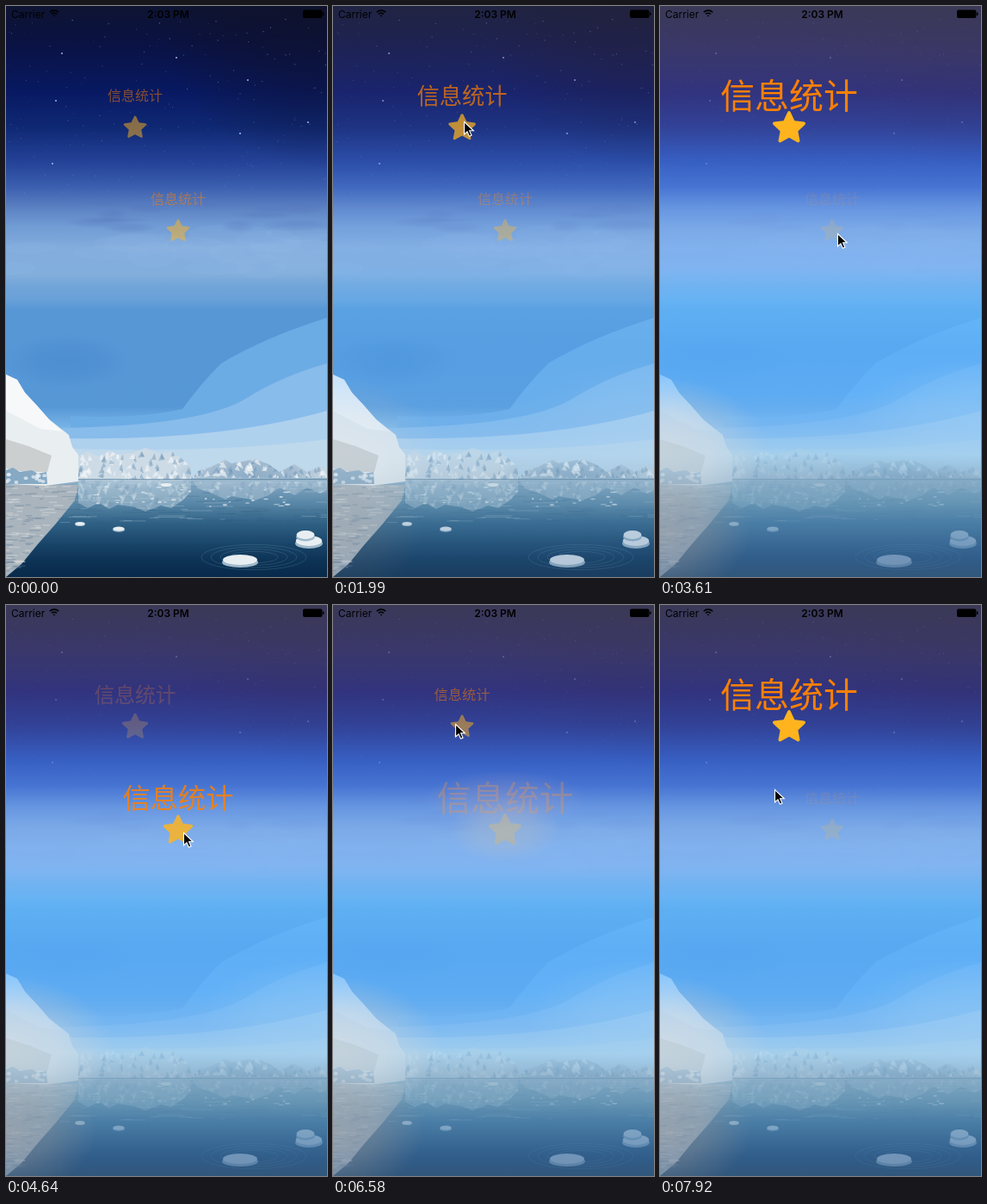
These frames come from a looping animation (373x663 px, 8000 ms). An HTML page with a canvas:

```html
<!DOCTYPE html>
<html lang="zh">
<head>
<meta charset="utf-8">
<style>
html, body { margin: 0; width: 100%; height: 100%; overflow: hidden; }
canvas { display: block; width: 100vw; height: 100vh; }
</style>
</head>
<body>
<canvas id="stage" width="373" height="663"></canvas>
<script>
const W = 373, H = 663, LOOP = 8000;
const ctx = document.getElementById('stage').getContext('2d');

let seed = 7;
const random = (min = 0, max = 1) => {
  seed = (seed * 16807) % 2147483647;
  return min + (max - min) * seed / 2147483647;
};

function layer(draw) {
  const canvas = document.createElement('canvas');
  canvas.width = W;
  canvas.height = H;
  draw(canvas.getContext('2d'));
  return canvas;
}

// Stops are [y, "r,g,b"] pairs.
function verticalFill(g, stops) {
  const top = stops[0][0], bottom = stops[stops.length - 1][0];
  const gradient = g.createLinearGradient(0, top, 0, bottom);
  for (const [y, rgb] of stops) gradient.addColorStop((y - top) / (bottom - top), `rgb(${rgb})`);
  g.fillStyle = gradient;
  g.fillRect(0, top, W, bottom - top);
}

function softSpot(g, x, y, rx, ry, rgb, alpha) {
  g.save();
  g.translate(x, y);
  g.scale(rx, ry);
  const gradient = g.createRadialGradient(0, 0, 0, 0, 0, 1);
  gradient.addColorStop(0, `rgba(${rgb},${alpha})`);
  gradient.addColorStop(.5, `rgba(${rgb},${alpha * .7})`);
  gradient.addColorStop(1, `rgba(${rgb},0)`);
  g.fillStyle = gradient;
  g.fillRect(-1, -1, 2, 2);
  g.restore();
}

function shape(g, path, color) {
  g.fillStyle = color;
  g.fill(new Path2D(path));
}

function blob(g, x, y, rx, ry, color) {
  g.fillStyle = color;
  g.beginPath();
  g.ellipse(x, y, rx, ry, 0, 0, 7);
  g.fill();
}

function drawSky(g) {
  verticalFill(g, [[0, '14,20,50'], [40, '10,18,65'], [100, '8,25,98'], [140, '15,40,115'],
    [180, '35,65,150'], [210, '60,95,175'], [235, '92,130,195'], [255, '112,155,212'],
    [280, '130,172,220'], [312, '130,174,220'], [325, '113,165,216'], [342, '104,160,217'],
    [352, '87,151,214'], [465, '86,151,214'], [490, '120,180,230'], [520, '172,208,236'], [550, '195,217,235']]);
  softSpot(g, W, 0, 200, 190, '16,16,36', .5);
  for (let i = 0; i < 24; i++)
    blob(g, random(0, W), random(262, 308), random(25, 60), random(6, 16), 'rgba(148,186,228,.13)');
  for (let i = 0; i < 12; i++)
    softSpot(g, random(90, W), random(228, 258), random(20, 45), random(3, 8), '85,115,185', .3);
  softSpot(g, 70, 412, 75, 32, '68,134,206', .5);
  shape(g, 'M373 362Q300 385 250 415Q225 440 205 468Q150 480 75 476V520H373Z', '#6cace5');
  shape(g, 'M373 415Q320 430 280 455Q230 487 65 490V520H373Z', '#88bceb');
  shape(g, 'M373 470Q250 505 70 502V550H373Z', '#aed1ee');
  shape(g, 'M373 503Q250 519 75 514V550H373Z', '#bed8ec');
  for (let i = 0; i < 170; i++) {
    const y = 15 + 215 * random() ** 1.2;
    g.fillStyle = `rgba(190,210,255,${random(.15, .65) * (1 - y / 330)})`;
    g.fillRect(random(0, W), y, 1, 1);
  }
  for (const [x, y] of [[198, 60], [351, 135], [65, 55], [58, 110], [272, 148], [54, 183], [281, 86]])
    blob(g, x, y, 1.1, 1.1, 'rgba(200,215,255,.75)');
}

function drawWater(g) {
  verticalFill(g, [[547, '165,192,212'], [560, '118,158,186'], [578, '88,134,166'], [600, '48,98,134'],
    [625, '24,68,104'], [645, '12,50,84'], [663, '8,42,74']]);
  shape(g, 'M0 556H84L80 574L58 601L36 626L18 648L0 663Z', '#a9b4bd');
  for (let i = 0; i < 120; i++) {
    const y = random(552, 600);
    g.fillStyle = random() < .5 ? 'rgba(225,235,242,.22)' : 'rgba(35,80,115,.2)';
    g.fillRect(random(60, W), y, random(5, 35), 1);
  }
  for (let i = 0; i < 100; i++) {
    const y = random(556, 655);
    g.fillStyle = random() < .55 ? 'rgba(235,235,232,.35)' : 'rgba(95,125,148,.35)';
    g.fillRect(random(-8, (663 - y) * .72), y, random(4, 16), 1.5);
  }
  g.strokeStyle = 'rgba(110,155,185,.25)';
  for (let r = 28; r < 62; r += 11) {
    g.beginPath();
    g.ellipse(288, 640, r, r * .24, 0, 0, 7);
    g.stroke();
  }
}

function drawIce(g) {
  const ridges = new Path2D('M84 550V523L95 517L108 523L120 516L130 521L150 518L162 513L180 520L192 517L205 526L215 536V550Z'
    + 'M217 548L223 540L240 534L255 527L262 531L290 526L305 532L318 541L335 532L350 541L365 534L373 538V548Z');
  const mountains = (scaleY, alpha) => {
    g.save();
    g.globalAlpha = alpha;
    g.translate(0, 550);
    g.scale(1, scaleY);
    g.translate(0, -550);
    g.fillStyle = '#cddbe6';
    g.fill(ridges);
    g.clip(ridges);
    softSpot(g, 285, 545, 95, 30, '125,160,190', .8);
    for (let i = 0; i < 210; i++) {
      const x = random(84, W), y = random(514, 548);
      g.fillStyle = random() < .5 ? 'rgba(245,248,250,.6)' : 'rgba(105,145,178,.45)';
      g.beginPath();
      g.moveTo(x, y);
      g.lineTo(x + random(1, 5), y + random(4, 10));
      g.lineTo(x - random(1, 5), y + random(3, 9));
      g.fill();
    }
    g.restore();
  };
  mountains(-1, .4);
  mountains(1, 1);
  g.fillStyle = 'rgba(70,110,140,.6)';
  g.fillRect(84, 549, W - 84, 1);

  shape(g, 'M0 428L13 434L22 449L36 464L50 480L73 498L77 512L84 521V552L46 557L0 555Z', '#e9eef1');
  shape(g, 'M0 428L13 434L22 449L36 464L50 480L66 494L40 491L0 470Z', '#f6f8f9');
  shape(g, 'M0 503L26 511L53 522L48 541L22 541L0 537Z', '#cbcfd0');
  shape(g, 'M0 539L8 536L16 541L30 539L37 543L47 541L48 555H0Z', '#86a9c4');
  for (let i = 0; i < 14; i++) blob(g, random(0, 45), random(543, 553), 2.5, 2, 'rgba(235,242,247,.7)');

  for (let i = 0; i < 34; i++)
    blob(g, random(100, 330), random(558, 582), random(1, 4), random(.5, 1.2), 'rgba(225,235,242,.75)');
  for (const [x, y, rx, ry] of [[272, 643, 21, 6], [352, 621, 16, 6], [348, 614, 11, 5], [131, 607, 7, 2.5], [86, 601, 6, 2], [186, 556, 7, 2]]) {
    blob(g, x, y + ry * .5, rx, ry, '#9fb9ca');
    blob(g, x, y, rx * .95, ry, '#e8eef2');
  }
}

const photo = layer(g => {
  drawSky(g);
  drawWater(g);
  drawIce(g);
});

const haze = layer(g => {
  verticalFill(g, [[0, '77,74,104'], [50, '79,72,121'], [100, '68,63,138'], [140, '65,78,167'],
    [180, '64,108,214'], [210, '76,126,226'], [235, '109,159,238'], [260, '128,175,240'],
    [300, '128,182,249'], [345, '100,187,255'], [400, '89,176,254'], [450, '96,180,255'],
    [490, '123,187,246'], [520, '152,203,237'], [548, '125,166,196'], [575, '109,156,186'],
    [600, '86,138,180'], [640, '64,111,161'], [663, '67,106,144']]);
  softSpot(g, W, 480, 150, 70, '160,210,245', .5);
  softSpot(g, 0, 515, 125, 85, '194,211,224', 1);
  softSpot(g, 0, 610, 105, 75, '150,158,168', .9);
});

const mix = (a, b, p) => a + (b - a) * p;

function ease(p) {
  p = Math.min(1, Math.max(0, p));
  return p * p * (3 - 2 * p);
}

function starPath(x, y, radius) {
  const points = Array.from({ length: 10 }, (_, i) => {
    const r = i % 2 ? radius * .52 : radius * 1.07, angle = i * Math.PI / 5;
    return [x + r * Math.sin(angle), y - r * Math.cos(angle)];
  });
  ctx.beginPath();
  ctx.moveTo((points[9][0] + points[0][0]) / 2, (points[9][1] + points[0][1]) / 2);
  points.forEach((point, i) => {
    const next = points[(i + 1) % 10];
    ctx.arcTo(...point, (point[0] + next[0]) / 2, (point[1] + next[1]) / 2, i % 2 ? .5 : radius * .09);
  });
  ctx.closePath();
}

function drawItem({ x, y, grow }) {
  const size = mix(16, 40, grow), radius = mix(14.7, 21, grow);
  ctx.globalAlpha = mix(.5, 1, grow);
  ctx.fillStyle = '#ffb41e';
  starPath(x, y + radius * .095, radius);
  ctx.fill();
  ctx.fillStyle = '#ff8000';
  ctx.font = `300 ${size}px "Noto Sans CJK SC", "Noto Sans CJK", sans-serif`;
  ctx.textAlign = 'center';
  ctx.fillText('信息统计', x, y - 36 + size * .38);
  ctx.globalAlpha = 1;
}

function drawStatusBar() {
  ctx.fillStyle = ctx.strokeStyle = '#000';
  ctx.textAlign = 'left';
  ctx.font = '400 12px Inter, Roboto, sans-serif';
  ctx.fillText('Carrier', 6, 13.5);
  ctx.textAlign = 'center';
  ctx.font = '600 12px Inter, Roboto, sans-serif';
  ctx.fillText('2:03 PM', 188.5, 13.5);
  ctx.lineWidth = 1.6;
  for (const r of [1, 4.2, 7.4]) {
    ctx.beginPath();
    ctx.arc(56, 12.5, r, -Math.PI * .75, -Math.PI * .25);
    ctx.stroke();
  }
  ctx.beginPath();
  ctx.roundRect(345, 4.5, 22.5, 9.5, 2);
  ctx.roundRect(368, 7.5, 1.5, 3.5, .7);
  ctx.fill();
}

// The screen refreshes in even ticks; pointer stops are [tick, x, y].
const TICK = 148.2;
const pointerStops = [[0, 351, 220], [1, 351, 220], [2, 312, 190], [3, 235, 142], [4, 178, 119], [5, 152, 134],
  [13, 152, 134], [14, 167, 152], [16, 221, 221], [17, 221, 221], [18, 234, 241], [19, 226, 258], [20, 211, 265],
  [21, 206, 264], [33, 206, 264], [34, 196, 258], [35, 150, 236], [36, 100, 202], [37, 74, 166], [38, 108, 143],
  [39, 142, 138], [47, 142, 138], [48, 136, 180], [49, 133, 235], [50, 133, 214]];

function pointerAt(tick) {
  const i = pointerStops.findIndex(stop => stop[0] >= tick);
  const [t1, x1, y1] = pointerStops[i], [t0, x0, y0] = pointerStops[Math.max(0, i - 1)];
  const p = t1 > t0 ? (tick - t0) / (t1 - t0) : 1;
  return [mix(x0, x1, p), mix(y0, y1, p)];
}

const arrow = new Path2D('M.5 .5V15L4 11.8L6.4 17.3L9 16.2L6.6 10.8H11.3Z');

function drawPointer(x, y) {
  ctx.save();
  ctx.translate(x, y);
  ctx.fillStyle = '#000';
  ctx.strokeStyle = '#fff';
  ctx.lineWidth = 1.1;
  ctx.fill(arrow);
  ctx.stroke(arrow);
  ctx.restore();
}

function render(ms) {
  const tick = Math.min(50, Math.floor((ms - 487) / TICK));
  const t = 500 + tick * TICK;
  const [first, second, third] = [1530, 4030, 6520].map(start => ease((t - start) / 1000));
  const upper = { x: 150, y: 140, grow: first - second + third };
  const lower = { x: 200, y: 260, grow: second - third };
  const lowerInFront = t >= 4030 && t < 6520;
  const [back, front] = lowerInFront ? [upper, lower] : [lower, upper];

  ctx.drawImage(photo, 0, 0);
  drawItem(back);
  ctx.globalAlpha = .7 * first;
  ctx.drawImage(haze, 0, 0);
  ctx.globalAlpha = 1;
  if (!lowerInFront && lower.grow > 0) {
    softSpot(ctx, 200, 224, 95, 32, '190,165,185', .25 * lower.grow);
    softSpot(ctx, 200, 262, 65, 38, '190,190,190', .35 * lower.grow);
  }
  drawItem(front);
  drawStatusBar();
  if (tick >= 0) drawPointer(...pointerAt(tick));
}

const begin = performance.now();
function loop() {
  render((performance.now() - begin) % LOOP);
  requestAnimationFrame(loop);
}
loop();
</script>
</body>
</html>
```
